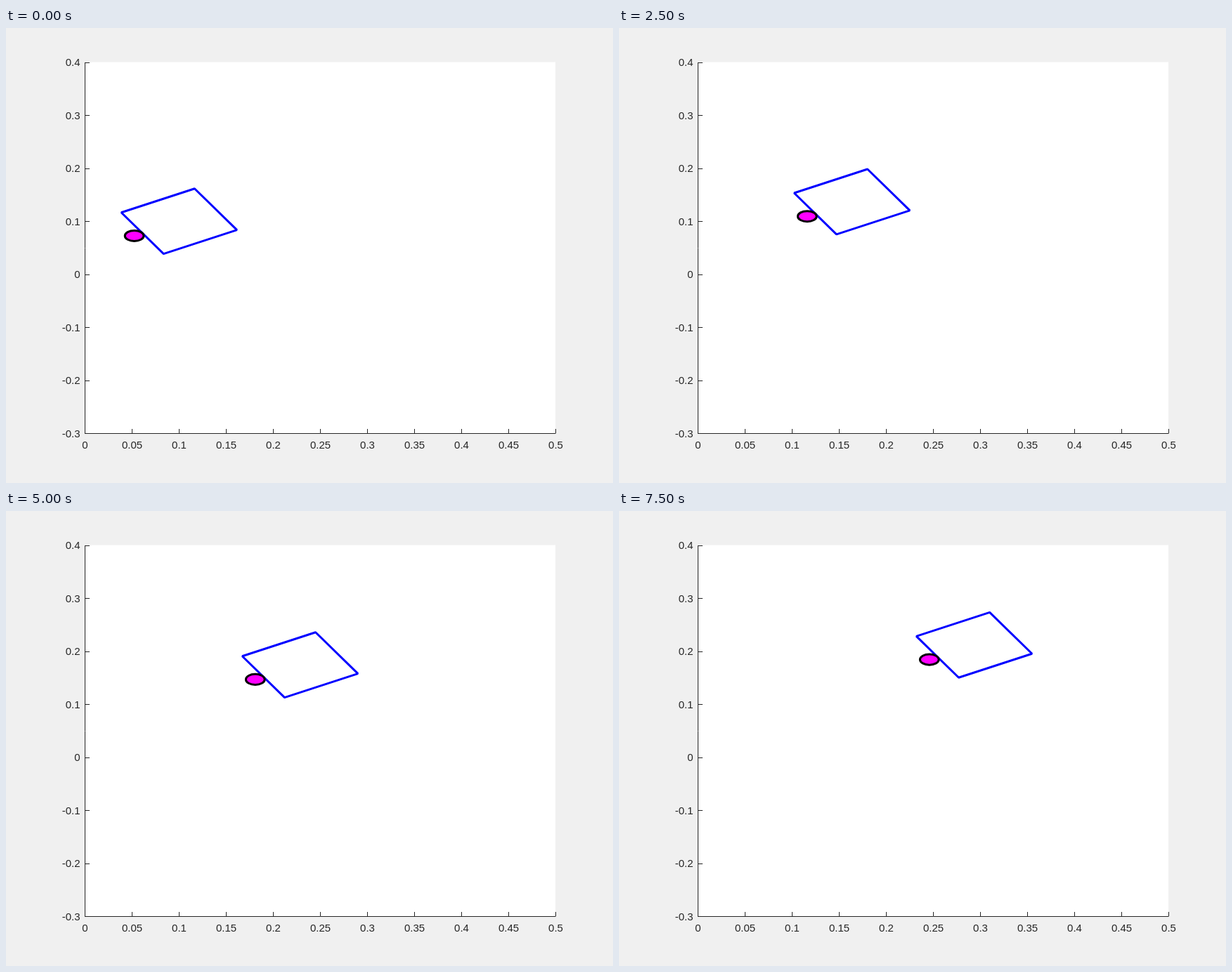
An HTML page with a canvas for the animation above (8 s loop, 864 by 648 pixels).

```html
<!DOCTYPE html>
<html lang="en">
<head>
<meta charset="utf-8">
<title>Pushed square</title>
<style>
html, body { margin: 0; width: 100%; height: 100%; overflow: hidden; background: #f0f0f0; }
canvas { display: block; }
</style>
</head>
<body>
<canvas id="stage" width="864" height="648"></canvas>
<script>
const ctx = document.getElementById("stage").getContext("2d");
const LOOP = 8000, STEP = 500, STRIDE = 0.0015;
const COS = Math.cos(Math.PI / 6), SIN = 0.5;
const HALF = 0.045, RADIUS = 0.01;
const SX = 1339, SY = 755;

const px = x => 112.5 + SX * x;
const py = y => 350.7 - SY * y;

function line(x1, y1, x2, y2) {
  ctx.beginPath();
  ctx.moveTo(x1, y1);
  ctx.lineTo(x2, y2);
  ctx.stroke();
}

function drawAxes() {
  ctx.fillStyle = "#f0f0f0";
  ctx.fillRect(0, 0, 864, 648);
  ctx.fillStyle = "#fff";
  ctx.fillRect(112, 48.5, 670, 529);

  ctx.strokeStyle = ctx.fillStyle = "#262626";
  ctx.lineWidth = 1;
  ctx.font = "15px 'Liberation Sans', Helvetica, Arial, sans-serif";
  line(112, 577.5, 782.5, 577.5);
  line(112.5, 49, 112.5, 578);

  ctx.textAlign = "center";
  for (let i = 0; i <= 10; i++) {
    const x = 112.5 + 67 * i;
    line(x, 571, x, 577);
    ctx.fillText(String(i * 5 / 100), x, 598.5);
  }
  ctx.textAlign = "right";
  for (let i = 0; i <= 7; i++) {
    const y = 577 - 75.5 * i;
    const tick = Math.round(y) + 0.5;
    line(112, tick, 119, tick);
    ctx.fillText(String((i - 3) / 10), 105.5, y + 5.5);
  }
}

// Square tilted by 30 degrees, with the disc touching its rear side
function drawBodies(cx, cy) {
  ctx.lineWidth = 3;
  ctx.lineJoin = "bevel";

  ctx.beginPath();
  for (const [u, v] of [[1, 1], [1, -1], [-1, -1], [-1, 1]]) {
    ctx.lineTo(px(cx + HALF * (u * COS - v * SIN)), py(cy + HALF * (u * SIN + v * COS)));
  }
  ctx.closePath();
  ctx.strokeStyle = "#00f";
  ctx.stroke();

  const gap = HALF + RADIUS;
  ctx.beginPath();
  ctx.ellipse(px(cx - gap * COS), py(cy - gap * SIN), RADIUS * SX, RADIUS * SY, 0, 0, 2 * Math.PI);
  ctx.fillStyle = "#f0f";
  ctx.fill();
  ctx.strokeStyle = "#000";
  ctx.stroke();
}

function frame() {
  // Simulation samples 1, 10, 20, 30, ... are shown, counted from 1
  const shown = Math.floor(performance.now() % LOOP / STEP);
  const travel = STRIDE * Math.max(0, 10 * shown - 1);
  drawAxes();
  drawBodies(0.1 + travel * COS, 0.1 + travel * SIN);
  requestAnimationFrame(frame);
}
frame();
</script>
</body>
</html>
```
